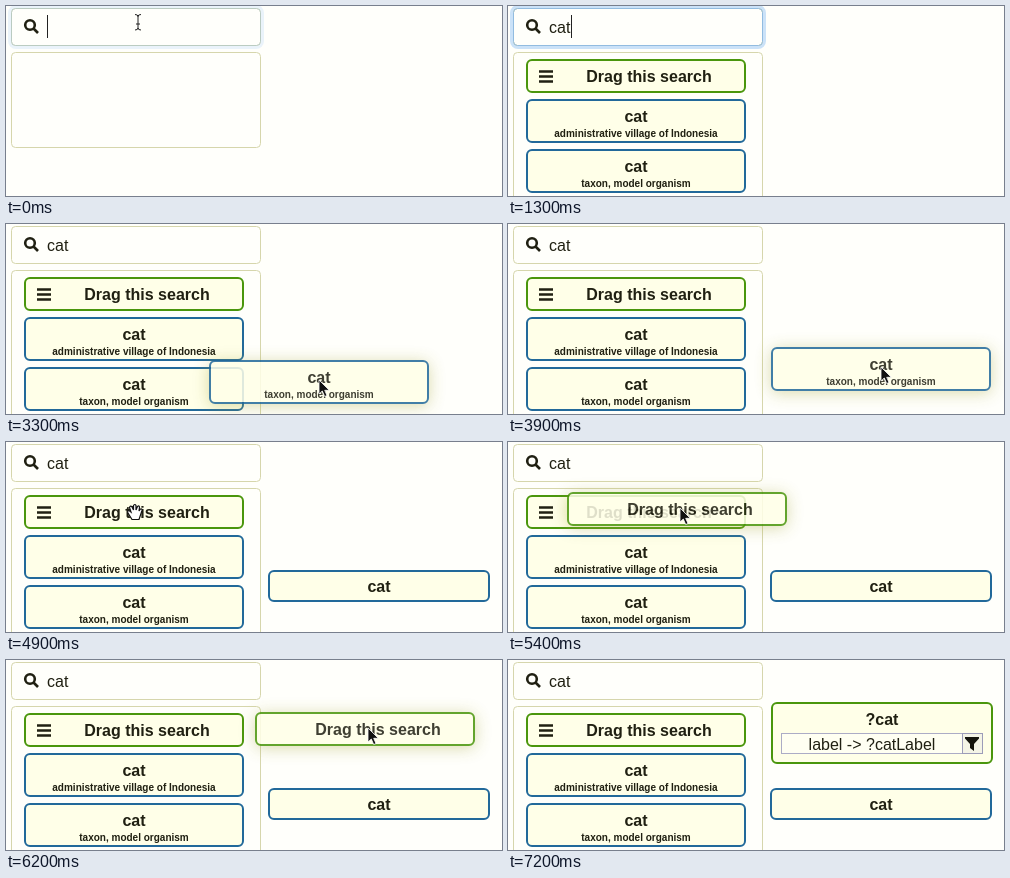
Recreate the animation shown at these times as an HTML page. Size 496 by 190 pixels, loop 7600 ms.

```html
<!DOCTYPE html>
<html lang="en">
<head>
<meta charset="utf-8">
<style>
html, body { margin: 0; width: 100%; height: 100%; overflow: hidden; background: #fffffb; }
svg { display: block; }
text { font: 16px "Liberation Sans", Arial, sans-serif; fill: #202012; }
.title, .sub { font-weight: bold; text-anchor: middle; }
.sub { font-size: 10px; }
.box { fill: #fffffb; stroke: #d6d6ac; }
.icon { fill: none; stroke: #202012; stroke-width: 2.6; }
.ghost { opacity: .86; filter: drop-shadow(0 2px 8px rgba(170, 170, 70, .5)); }
</style>
</head>
<body>
<svg id="stage" width="496" height="190" viewBox="0 0 496 190"></svg>
<script>
const LOOP = 7600, STEP = 100;
const GREEN = '#4a960c', BLUE = '#22699a';
const stage = document.getElementById('stage');

// Pointer positions [ms, x, y], joined by straight moves
const path = [
  [0, 132, 16], [1800, 132, 20], [2500, 129, 160], [2800, 129, 163],
  [3300, 313, 156], [3700, 373, 143], [4000, 373, 143],
  [4600, 131, 73], [4900, 129, 70], [5100, 131, 70], [5400, 172, 66],
  [5700, 366, 57], [5900, 372, 62], [6200, 362, 68], [LOOP, 362, 68]
];

function card(x, y, w, h, color, title, sub, shift = 0) {
  const cx = w / 2 + shift, base = sub || h > 50 ? 23 : h / 2 + 6;
  return `<g transform="translate(${x} ${y})">
    <rect x="1" y="1" width="${w - 2}" height="${h - 2}" rx="5" fill="#ffffe8" stroke="${color}" stroke-width="2"/>
    <text class="title" x="${cx}" y="${base}">${title}</text>
    ${sub ? `<text class="sub" x="${cx}" y="38">${sub}</text>` : ''}</g>`;
}

const searchCard = (x, y) => card(x, y, 220, 34, GREEN, 'Drag this search', '', 13);
const taxonCard = (x, y) => card(x, y, 220, 44, BLUE, 'cat', 'taxon, model organism');

const results = searchCard(18, 53) +
  '<path class="icon" d="M31 65.5h14M31 70.5h14M31 75.5h14"/>' +
  card(18, 93, 220, 44, BLUE, 'cat', 'administrative village of Indonesia') +
  taxonCard(18, 143);

const variable = card(263, 42, 222, 62, GREEN, '?cat');
const label = `<rect x="273.5" y="73.5" width="201" height="20" fill="#fffff2" stroke="#acacc6"/>
  <rect x="454.5" y="73.5" width="20" height="20" fill="#f4f4e6" stroke="#9c9cb8"/>
  <text x="364" y="90" text-anchor="middle">label -&gt; ?catLabel</text>
  <path d="M457 77h14v1.5l-5 5.5v7l-4-3v-4l-5-5.5z" fill="#14140c"/>`;

const pointers = {
  beam: '<path d="M-3-7.5Q0-7.5 0-5.5Q0-7.5 3-7.5M0-6V7M-3 8Q0 8 0 6Q0 8 3 8M-2 2h4" fill="none" stroke="#222"/>',
  hand: '<path d="M-3 7.5L-7 1Q-8-1.500-6-1.500L-4 0L-5.500-4.500Q-4.500-7-3-5L-1.500-2V-6.500Q0-8.500 1-6.500V-2L2.500-5.500Q4.500-7 4.500-4.500L4-1L5.500-3Q7.500-3.500 7-1.500L5 4.500L4 7.500Z" fill="#fff" stroke="#111" stroke-width="1.2"/>',
  arrow: '<path d="M0 0V14L3.300 11L5.700 16.500L8 15.500L5.700 10.300H10.300Z" fill="#111" stroke="#fff" stroke-width=".8"/>'
};

const clamp = v => Math.max(0, Math.min(1, v));

function pointerAt(t) {
  const i = path.findIndex(p => p[0] > t);
  const [t0, x0, y0] = path[i - 1], [t1, x1, y1] = path[i];
  const u = (t - t0) / (t1 - t0);
  return [x0 + (x1 - x0) * u, y0 + (y1 - y0) * u];
}

function searchBox(t) {
  const focus = clamp(.4 + t / 500) * clamp((3100 - t) / 200);
  const typed = t < 500 ? '' : t < 600 ? 'c' : t < 900 ? 'ca' : 'cat';
  const caretX = 41.5 + [0, 8, 17, 22][typed.length];
  const caretOn = t < 1400 || (t >= 1900 && t < 2400);
  return `<rect x="4" y="1" width="252" height="40" rx="6" fill="none" stroke="#cbe2f8" stroke-width="4" opacity="${focus}"/>
    <rect class="box" x="5.5" y="2.5" width="249" height="37" rx="4"/>
    <rect x="5.5" y="2.5" width="249" height="37" rx="4" fill="none" stroke="#92bce0" opacity="${focus}"/>
    <circle class="icon" cx="24" cy="19" r="4.8"/><path class="icon" d="M27.5 22.500l4.500 4.500"/>
    <text x="41" y="27">${typed}</text>
    ${caretOn ? `<path d="M${caretX} 9V32" stroke="#222"/>` : ''}`;
}

function pointerKind(t, x, y) {
  if ((t >= 500 && t < 1800) || t >= 7200) return '';
  if (y < 42 && x < 255) return 'beam';
  const dragging = (t > 2800 && t < 4000) || t > 5000;
  return !dragging && x > 18 && x < 238 && y > 53 ? 'hand' : 'arrow';
}

function draw(t) {
  const [x, y] = pointerAt(t), kind = pointerKind(t, x, y);
  let svg = searchBox(t);
  svg += `<rect class="box" x="5.5" y="46.5" width="249" height="${t < 1000 ? 95 : 170}" rx="4"/>`;
  if (t >= 1000) svg += results;
  if (t >= 4000) svg += card(262, 128, 222, 32, BLUE, 'cat');
  if (t >= 7000) svg += variable;
  if (t >= 7100) svg += label;
  if (t > 2800 && t < 4000) svg += `<g class="ghost">${taxonCard(x - 110, y - 20)}</g>`;
  if (t > 5000 && t < 7000) svg += `<g class="ghost">${searchCard(x - 113, y - 16)}</g>`;
  if (kind) svg += `<g transform="translate(${x} ${y})">${pointers[kind]}</g>`;
  stage.innerHTML = svg;
}

const start = performance.now();
let shown = -1;
function tick() {
  const t = Math.floor((performance.now() - start) % LOOP / STEP) * STEP;
  if (t !== shown) draw(shown = t);
  requestAnimationFrame(tick);
}
tick();
</script>
</body>
</html>
```
